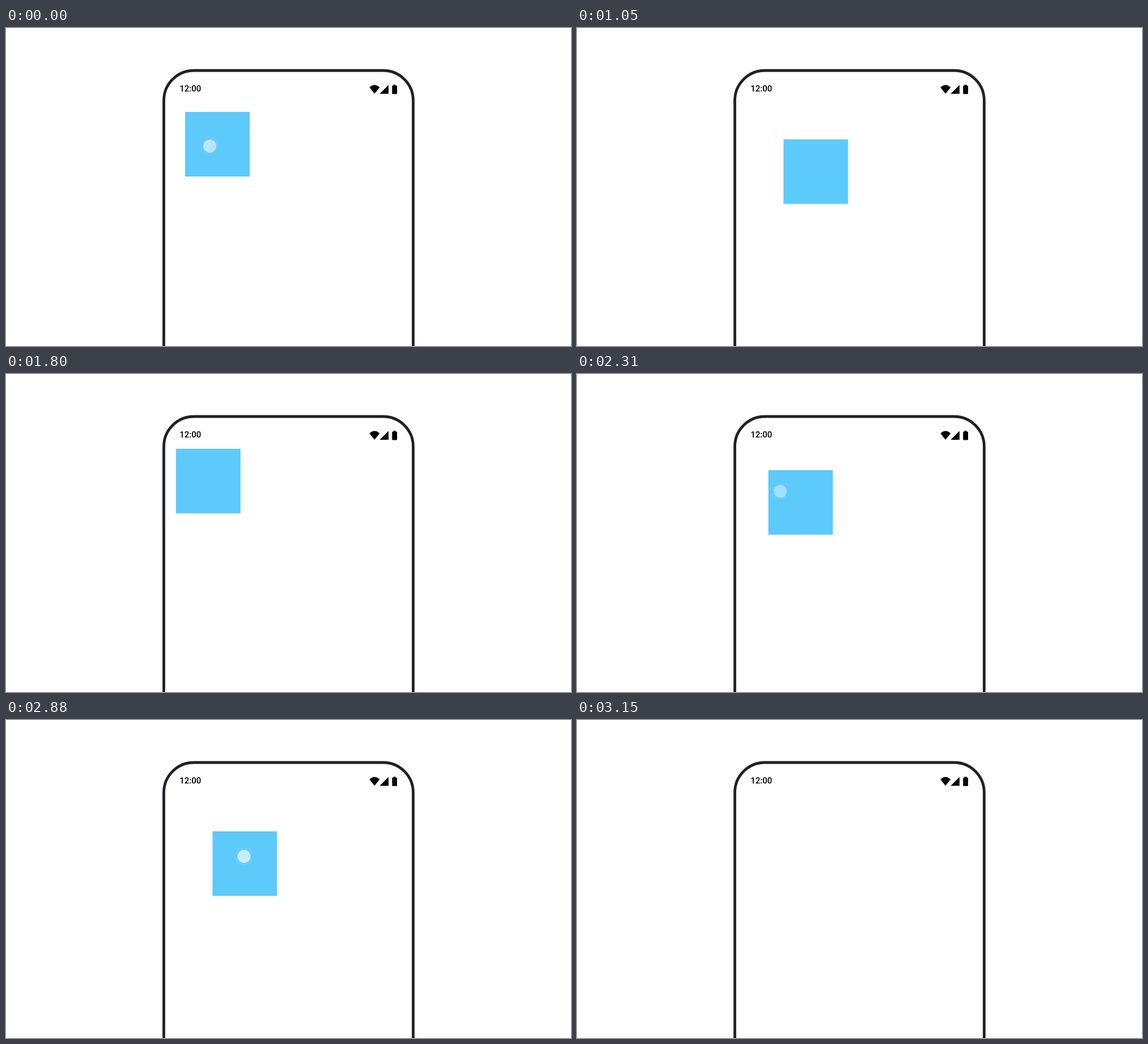
Recreate the animation shown at these times as an HTML page. Size 997x561 px, loop 4080 ms.

```html
<!DOCTYPE html>
<html lang="en">
<head>
<meta charset="utf-8">
<title>Tap to move</title>
<style>
  html, body { margin: 0; width: 100%; height: 100%; overflow: hidden; background: #fff; }
  svg { display: block; width: 997px; height: 561px; }
  text { font: 500 15px Roboto, sans-serif; }
</style>
</head>
<body>
<svg viewBox="0 0 997 561">
  <rect x="278.5" y="75" width="440" height="600" rx="53" fill="none" stroke="#202124" stroke-width="4.8"/>
  <text x="306.2" y="111.6">12:00</text>
  <path d="M650.3 116 641.3 104.8Q650.3 96 659.4 104.8Z"/>
  <path d="M675 100.5V116H659.5Z"/>
  <path d="M683.6 100h4v1.7h1.6q.9 0 .9.9v12.9q0 .9-.9.9h-7q-.9 0-.9-.9v-12.9q0-.9.9-.9h1.4z"/>
  <rect id="box" width="113.9" height="113.9" fill="#5ccafa"/>
  <g id="dot">
    <circle r="15" fill="#d5d5e2" fill-opacity=".26"/>
    <circle r="12.3" fill="#3c98c8" fill-opacity=".4"/>
    <circle r="11.6" fill="#fff" fill-opacity=".95"/>
  </g>
</svg>
<script>
  const LOOP = 4080, STEP = 30, GONE = 3150;
  const NEAR = 299.3, FAR = 365.8, RISE = -168;
  const box = document.getElementById('box');
  const dot = document.getElementById('dot');

  // down: finger lands; go: square starts to move; last: steps until it rests
  const taps = [
    { down: 0,    go: 870,  last: 6, from: NEAR, to: FAR,  x: 359.6, y: 208.3 },
    { down: 1560, go: 1590, last: 7, from: FAR,  to: NEAR, x: 422.6, y: 262.2 },
    { down: 2160, go: 2250, last: 6, from: NEAR, to: FAR,  x: 358.6, y: 207 },
    { down: 2880, go: 2940, last: 6, from: FAR,  to: NEAR, x: 420,   y: 240.6 }
  ];

  // critically damped spring
  const spring = k => {
    const a = 0.968 * k;
    return 1 - (1 + a) * Math.exp(-a);
  };

  function draw(ms) {
    const t = Math.floor((ms % LOOP) / STEP) * STEP;
    const i = taps.findLastIndex(p => t >= p.down);
    const tap = taps[i];
    const first = i === 0 ? 1 : 0; // the loop opens already under way
    const k = Math.max(first, (t - tap.go) / STEP);

    let x = tap.from + (tap.to - tap.from) * spring(Math.min(k, tap.last));
    if (k <= 0) {
      const prev = taps[i - 1];
      x = prev.from + (prev.to - prev.from) * spring(prev.last);
    }
    box.setAttribute('x', x);
    box.setAttribute('y', x + RISE);
    box.style.visibility = dot.style.visibility = t < GONE ? 'visible' : 'hidden';

    dot.setAttribute('transform', `translate(${tap.x} ${tap.y})`);
    dot.setAttribute('opacity', Math.max(0, 0.69 - 0.125 * k));
  }

  function tick() {
    draw(performance.now() - start);
    requestAnimationFrame(tick);
  }
  const start = performance.now();
  tick();
</script>
</body>
</html>
```
